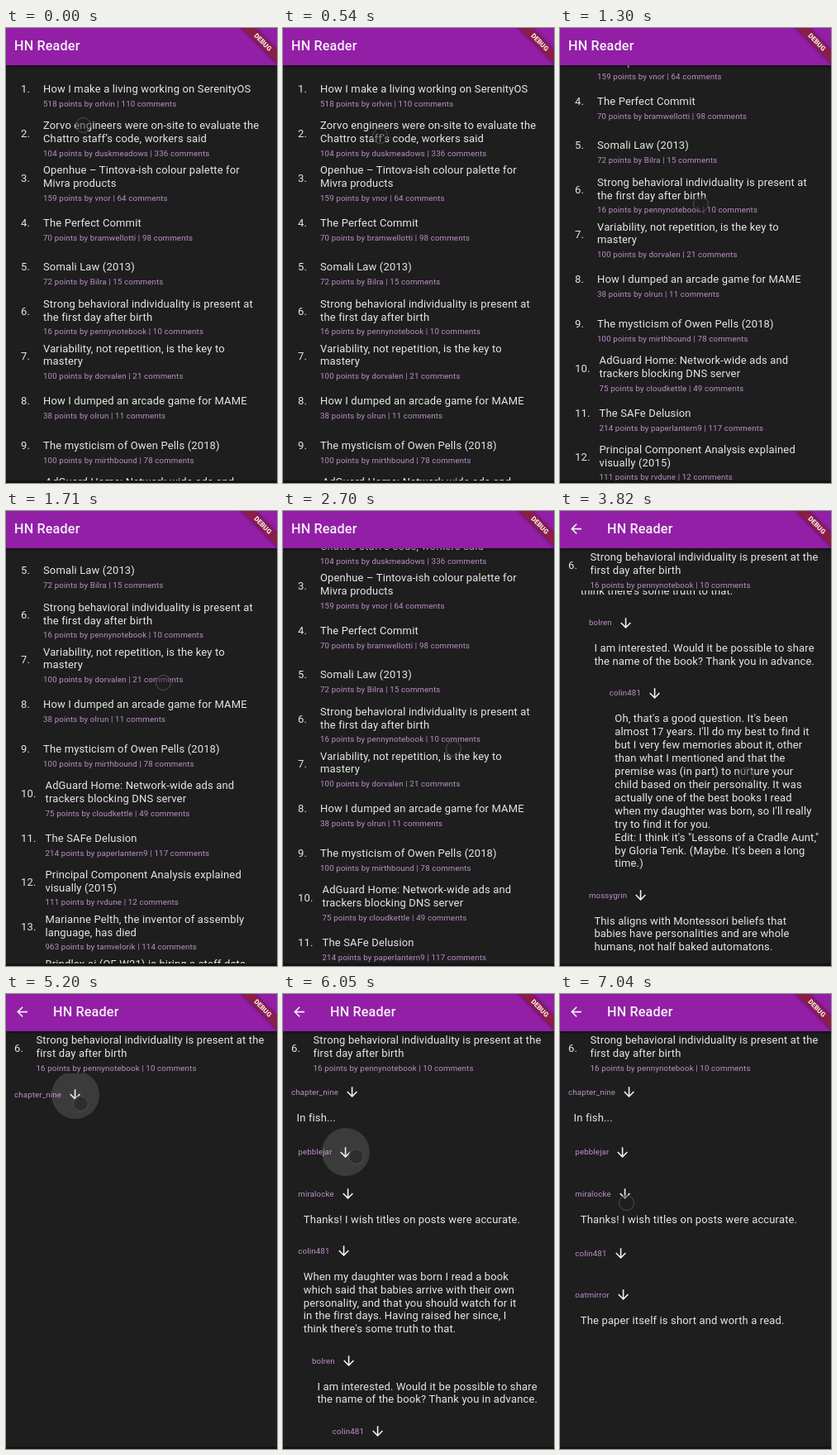
Write an HTML page that moves like this. It is 328 px wide and 550 px high and loops after 7.11 s.

```html
<!DOCTYPE html>
<html lang="en">
<head>
<meta charset="utf-8">
<title>HN Reader</title>
<style>
html, body { margin: 0; width: 100%; height: 100%; overflow: hidden; background: #1e1e1e; }
#stage { position: relative; width: 328px; height: 550px; overflow: hidden; background: #1e1e1e;
  color: #e6e6e6; font: 13px/15.9px Roboto, sans-serif; letter-spacing: .15px; }
#stage div { position: absolute; }
.text { white-space: pre; }
.sub { font-size: 9.7px; color: #bd8ec8; }
.page { inset: 0; overflow: hidden; }
.bar { left: 0; top: 0; width: 328px; height: 45px; background: #921fa6; box-shadow: 0 1px 4px rgba(0,0,0,.55); }
.bar .text { font-size: 16.2px; font-weight: 500; line-height: 20px; top: 12px; color: #f4eef6; }
.bar svg { position: absolute; left: 10.4px; top: 12.4px; }
.scroller { left: 0; top: 0; width: 328px; }
#clip { left: 0; top: 96px; width: 328px; height: 454px; overflow: hidden; }
.name { display: flex; align-items: center; gap: 7px; height: 20px; }
.name i { position: relative; width: 19.2px; height: 19.2px; }
.name svg { position: absolute; left: 0; top: 0; }
.ripple { left: -19.4px; top: -19.4px; width: 58px; height: 58px; border-radius: 50%; background: rgba(255,255,255,.13); }
svg { fill: #f2f2f2; }
#press { left: 0; width: 328px; height: 54px; background: rgba(255,255,255,.07); }
#banner { left: 271px; top: 18.5px; width: 80px; height: 11px; background: #8c1d48; color: #f3e6ea;
  font-size: 8.2px; font-weight: 900; line-height: 11px; text-align: center; letter-spacing: 0;
  box-shadow: 0 0 4px rgba(0,0,0,.5); }
#corner { left: 0; top: 0; width: 0; height: 0; transform: translate(328px, 0) rotate(45deg); }
#corner #banner { left: -40px; }
#edge { left: 0; bottom: 0; width: 328px; height: 3px; background: #151215; }
#cursor { left: -9.5px; top: -9.5px; width: 17px; height: 17px; border: 1px solid #505050; border-radius: 50%;
  background: rgba(30,30,30,.45); }
</style>
</head>
<body>
<div id="stage">
  <div class="page" id="listPage">
    <div class="scroller" id="list"><div id="press"></div></div>
    <div class="bar"><div class="text" style="left:10px">HN Reader</div></div>
  </div>
  <div class="page" id="threadPage">
    <div id="clip"><div class="scroller" id="thread"></div></div>
    <div class="bar">
      <svg width="19.2" height="19.2" viewBox="0 0 24 24"><path d="M20 11H7.83l5.59-5.59L12 4l-8 8 8 8 1.41-1.41L7.83 13H20z"/></svg>
      <div class="text" style="left:57px">HN Reader</div>
    </div>
  </div>
  <div id="edge"></div>
  <div id="corner"><div id="banner">DEBUG</div></div>
  <div id="cursor"></div>
</div>
<script>
const $ = id => document.getElementById(id);
const LOOP = 7110, LINE = 15.9, PITCH = 53.85;

// title | points | author | comments
const stories = `How I make a living working on SerenityOS|518|orlvin|110
Zorvo engineers were on-site to evaluate the/Chattro staff’s code, workers said|104|duskmeadows|336
Openhue – Tintova-ish colour palette for/Mivra products|159|vnor|64
The Perfect Commit|70|bramwellotti|98
Somali Law (2013)|72|Bilra|15
Strong behavioral individuality is present at/the first day after birth|16|pennynotebook|10
Variability, not repetition, is the key to/mastery|100|dorvalen|21
How I dumped an arcade game for MAME|38|olrun|11
The mysticism of Owen Pells (2018)|100|mirthbound|78
AdGuard Home: Network-wide ads and/trackers blocking DNS server|75|cloudkettle|49
The SAFe Delusion|214|paperlantern9|117
Principal Component Analysis explained/visually (2015)|111|rvdune|12
Marianne Pelth, the inventor of assembly/language, has died|963|tamvelorik|114
Brindlex.ai (QF W21) is hiring a staff data/scientist|1|hazelwick|0
A small guide to writing parsers by hand|87|fernloop|32
Why old maps are hard to read|54|quietharbor|19
Notes on building a wooden clock|41|tallowby|8`.split("\n").map(s => s.split("|"));

// depth, author, lines
const comments = [
  [0, "chapter_nine", "In fish..."],
  [1, "pebblejar", "The title should mention the animals studied,\nas most readers will assume it is about people."],
  [1, "miralocke", "Thanks! I wish titles on posts were accurate."],
  [1, "colin481", "When my daughter was born I read a book\nwhich said that babies arrive with their own\npersonality, and that you should watch for it\nin the first days. Having raised her since, I\nthink there's some truth to that."],
  [2, "bolren", "I am interested. Would it be possible to share\nthe name of the book? Thank you in advance."],
  [3, "colin481", "Oh, that's a good question. It's been\nalmost 17 years. I'll do my best to find it\nbut I very few memories about it, other\nthan what I mentioned and that the\npremise was (in part) to nurture your\nchild based on their personality. It was\nactually one of the best books I read\nwhen my daughter was born, so I'll really\ntry to find it for you.\nEdit: I think it's \"Lessons of a Cradle Aunt,\"\nby Gloria Tenk. (Maybe. It's been a long\ntime.)"],
  [2, "mossygrin", "This aligns with Montessori beliefs that\nbabies have personalities and are whole\nhumans, not half baked automatons."],
  [3, "lanternfog", "That matches what I have seen as well."],
  [2, "brookpine", "Two children, same house, and they were\ndifferent from the very first day."],
  [1, "oatmirror", "The paper itself is short and worth a read."]
];

function add(parent, cls, x, y, text = "") {
  const el = document.createElement("div");
  el.className = cls;
  el.style.left = x + "px";
  el.style.top = y + "px";
  el.textContent = text;
  parent.append(el);
  return el;
}

// Title block whose number is centred on y
function story(parent, i, y, numX, x, title) {
  const [, points, author, count] = stories[i];
  const two = title.includes("/");
  const top = y - LINE / 2;
  add(parent, "text", numX, top, i + 1 + ".");
  add(parent, "text", x, top - (two ? 9.6 : 0), title.replace("/", "\n"));
  add(parent, "text sub", x, top + (two ? 24 : 18), `${points} points by ${author} | ${count} comments`);
}

stories.forEach((s, i) => story($("list"), i, 74 + i * PITCH, 18, i < 9 ? 45 : 47.5, s[0]));
$("press").style.top = 74 + 5 * PITCH - 27 + "px";
story($("threadPage"), 5, 66, 10, 36.5, "Strong behavioral individuality is present at the/first day after birth");

const rows = comments.map(([depth, author, text]) => {
  const x = 10 + 4.15 * depth * (depth + 1);
  const box = add($("thread"), "", 0, 0);
  const name = add(box, "name sub", x, 0, author);
  name.insertAdjacentHTML("beforeend", `<i><div class="ripple"></div><svg width="19.2" height="19.2" viewBox="0 0 24 24">
    <path d="M20 12l-1.41-1.41L13 16.17V4h-2v12.17l-5.58-5.59L4 12l8 8z"/></svg></i>`);
  const body = add(box, "text", x + 6.5, 53 - LINE / 2, text);
  const full = 69.2 + LINE * (text.split("\n").length - 1);
  return { depth, box, name, body, full, ripple: name.querySelector(".ripple") };
});

// Stacks the comments; a collapsed one hides its text and its replies
function layout(closed, rippleRow, ripple) {
  let y = 1, hideBelow = Infinity;
  rows.forEach((r, i) => {
    if (r.depth <= hideBelow) hideBelow = Infinity;
    const hidden = r.depth > hideBelow, shut = closed.includes(i);
    r.box.style.display = hidden ? "none" : "";
    r.ripple.style.display = i === rippleRow ? "" : "none";
    r.ripple.style.transform = `scale(${ripple})`;
    if (hidden) return;
    r.box.style.top = y + "px";
    r.name.style.top = (shut ? 25 : 22) - 10 + "px";
    r.body.style.display = shut ? "none" : "";
    y += shut ? 53.3 : r.full;
    if (shut) hideBelow = r.depth;
  });
}

// Screen refresh times: [interval, repeats]
const ticks = [0];
for (const [gap, n] of [[130, 2], [70, 8], [130, 2], [70, 12], [130, 9], [200, 1], [130, 1], [200, 5], [260, 5], [330, 4]])
  for (let i = 0; i < n; i++) ticks.push(ticks[ticks.length - 1] + gap);

// Linear track through [time, ...values]
function track(keys, t) {
  const j = keys.findIndex(k => k[0] > t);
  if (j < 0) return keys[keys.length - 1].slice(1);
  const a = keys[j - 1], b = keys[j], p = (t - a[0]) / (b[0] - a[0]);
  return a.slice(1).map((v, i) => v + (b[i + 1] - v) * p);
}

const listScroll = [[0, 0], [540, 0], [820, 62], [950, 84], [1360, 160], [1710, 217], [1920, 262],
  [2180, 262], [2310, 238], [2440, 190], [2700, 91], [2960, 66], [3290, 66]];
const deep = rows.slice(0, 4).reduce((sum, r) => sum + r.full, 97) - 113.3;
const threadScroll = [[0, 0], [3420, 0], [3620, deep * .55], [3820, deep], [4020, deep + 130],
  [4220, deep], [4420, deep * .45], [4680, 0]];
const pointer = [[0, 93, 117], [130, 93, 117], [540, 117, 130], [1080, 160, 215], [1710, 190, 207],
  [2180, 198, 178], [2440, 204, 235], [2700, 206, 287], [3290, 200, 288], [3620, 222, 350], [3820, 225, 319],
  [4020, 226, 270], [4420, 200, 300], [4680, 130, 190], [4940, 86, 128], [5200, 90, 132], [5460, 87, 130],
  [5720, 88, 140], [6050, 88, 196], [6380, 78, 318], [6710, 84, 280], [7040, 80, 252]];
// from, collapsed rows, row with ripple, ripple size
const folds = [[0, [], -1, 0], [4940, [], 0, .5], [5200, [0], 0, 1], [5460, [0], 0, .6], [5720, [], -1, 0],
  [6050, [1], 1, 1], [6380, [1, 3], 3, 1], [6710, [1, 3], -1, 0]];

const last = (list, t, at) => list.filter(v => at(v) <= t).pop();
const start = performance.now();

function draw() {
  const now = Math.max(0, performance.now() - start) % LOOP;
  const t = last(ticks, now, v => v);
  const inThread = t >= 3420;
  $("listPage").style.display = inThread ? "none" : "";
  $("threadPage").style.display = inThread ? "" : "none";
  $("press").style.display = t === 3290 ? "" : "none";
  $("list").style.transform = `translateY(${-track(listScroll, t)[0]}px)`;
  $("thread").style.transform = `translateY(${-track(threadScroll, t)[0]}px)`;
  layout(...last(folds, t, f => f[0]).slice(1));
  const [x, y] = track(pointer, t);
  $("cursor").style.transform = `translate(${x}px, ${y}px)`;
  requestAnimationFrame(draw);
}
draw();
</script>
</body>
</html>
```
